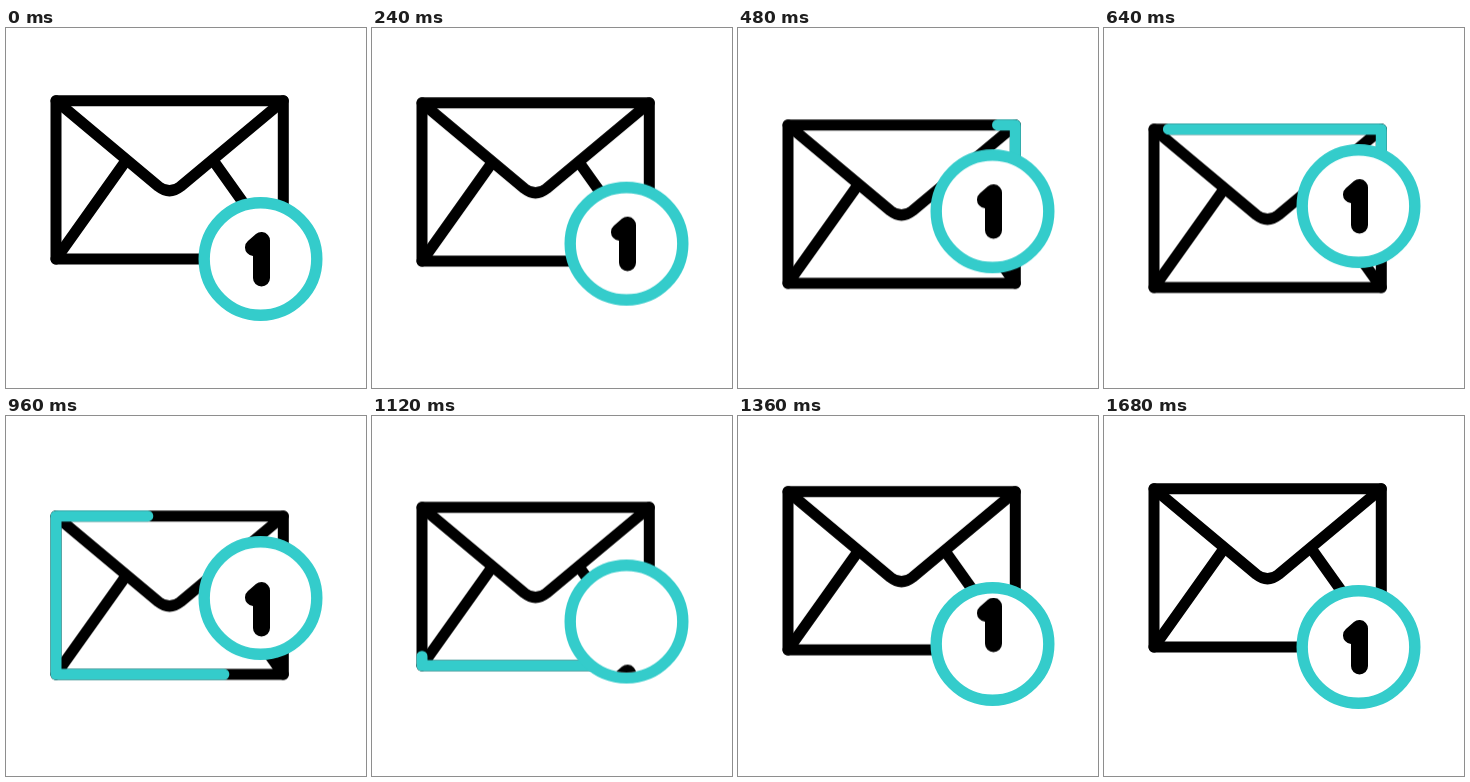
These frames come from a looping animation (360x360 px, 2 s). An HTML page:

```html
<!DOCTYPE html>
<html lang="en">
<head>
<meta charset="utf-8">
<title>New message</title>
<style>
  @property --head { syntax: "<number>"; inherits: false; initial-value: 0; }
  @property --tail { syntax: "<number>"; inherits: false; initial-value: 0; }

  :root { --teal: #34cccb; }
  html, body { margin: 0; width: 100%; height: 100%; overflow: hidden; background: #fff; }
  svg { display: block; width: 100vw; height: 100vh; }

  .line { fill: none; stroke: #000; stroke-width: 11; stroke-linecap: round; stroke-linejoin: round; }
  .ring { fill: #fff; stroke: var(--teal); stroke-width: 11.4; }
  .digit { stroke-width: 17; }

  .envelope, .badge, .digits, .trace { animation: 2s linear infinite; }
  .envelope { animation-name: sink; }
  .badge { animation-name: rise; }
  .digits { animation-name: roll; }

  /* The visible stretch of the outline runs from --tail to --head. */
  .trace {
    stroke: var(--teal);
    stroke-dasharray: calc((var(--head) - var(--tail)) * 1px) 999px;
    stroke-dashoffset: calc(var(--tail) * -1px);
    animation-name: head, tail;
  }

  @keyframes sink {
    0% { transform: translateY(0); }
    4.6% { transform: translateY(0); animation-timing-function: cubic-bezier(.6, 0, .2, 1); }
    37.8% { transform: translateY(29px); }
    39% { transform: translateY(29px); animation-timing-function: cubic-bezier(.6, 0, .2, 1); }
    83.5%, 100% { transform: translateY(0); }
  }
  @keyframes rise {
    0% { transform: translateY(0); }
    4% { transform: translateY(0); animation-timing-function: cubic-bezier(.35, 0, .2, 1); }
    36.5% { transform: translateY(-53.5px); }
    38.2% { transform: translateY(-53.5px); animation-timing-function: cubic-bezier(.6, 0, .2, 1); }
    79.5%, 100% { transform: translateY(0); }
  }
  @keyframes roll {
    0% { transform: translateY(0); }
    39% { transform: translateY(0); animation-timing-function: cubic-bezier(.6, 0, .2, 1); }
    83.5%, 100% { transform: translateY(195px); }
  }
  @keyframes head {
    0% { --head: 0; }
    12.8% { --head: 0; animation-timing-function: cubic-bezier(.333, 0, .667, 1); }
    52.7%, 100% { --head: 697; }
  }
  @keyframes tail {
    0% { --tail: 0; }
    34.2% { --tail: 0; animation-timing-function: cubic-bezier(.333, 0, .667, 1); }
    68.2%, 100% { --tail: 697; }
  }
</style>
</head>
<body>
<svg viewBox="0 0 360 360">
  <defs>
    <clipPath id="hole"><circle cx="254.5" cy="231" r="51"/></clipPath>
    <path id="one" class="line digit" d="M247.5 219.5L255.5 212.5V250"/>
  </defs>

  <g class="envelope">
    <g class="line">
      <path d="M50 72.7H277.3V231H50Z"/>
      <path d="M50 72.7L152.5 158.5Q163.5 167 174.5 158.5L277.3 72.7"/>
      <path d="M50 231L119 134M277.3 231L208.3 134"/>
    </g>
    <path class="line trace" d="M277.3 190V72.7H50V231H245"/>
  </g>

  <g class="badge">
    <circle class="ring" cx="254.5" cy="231" r="56.3"/>
    <g clip-path="url(#hole)">
      <g class="digits">
        <use href="#one"/>
        <use href="#one" y="-195"/>
      </g>
    </g>
  </g>
</svg>
</body>
</html>
```
